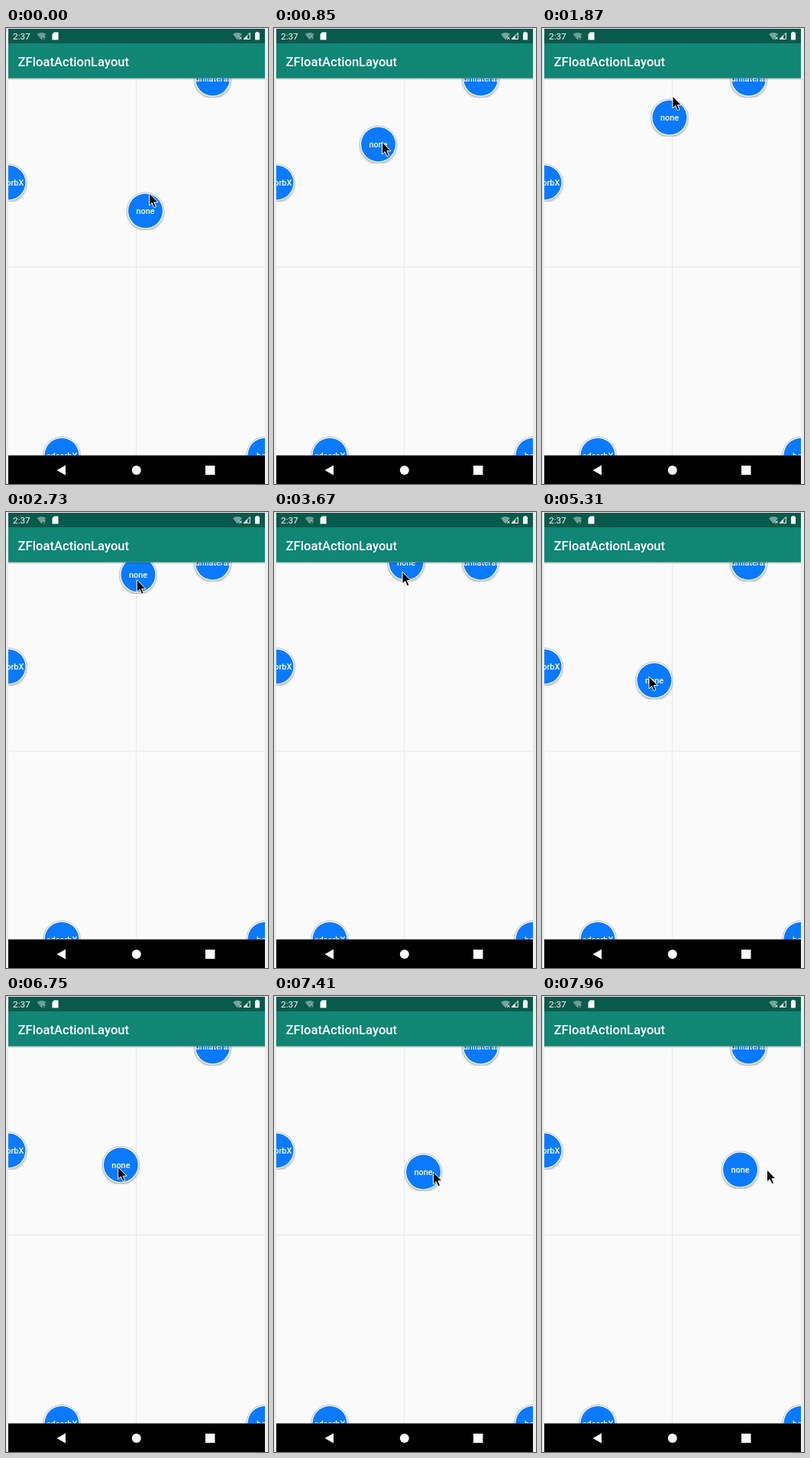
Write an HTML page that moves like this. It is 343x596 px and loops after 8000 ms.

```html
<!DOCTYPE html>
<html lang="en">
<head>
<meta charset="utf-8">
<title>Floating action layout</title>
<style>
  html, body { margin: 0; width: 100%; height: 100%; overflow: hidden; background: #ececec; }
  svg { display: block; width: 343px; height: 596px; }
  text { font-family: Roboto, Arial, sans-serif; fill: #fff; }
  .ball text { font-size: 10.9px; font-weight: 500; text-anchor: middle; }
  .title { font-size: 16.6px; font-weight: 500; }
  .clock { font-size: 11.8px; }
</style>
</head>
<body>
<svg viewBox="0 0 343 596" xmlns="http://www.w3.org/2000/svg">
  <defs>
    <clipPath id="content"><rect x="3" y="65.7" width="336" height="493"/></clipPath>
    <linearGradient id="barShadow" x1="0" y1="0" x2="0" y2="1">
      <stop offset="0" stop-color="#000" stop-opacity=".24"/>
      <stop offset="1" stop-color="#000" stop-opacity="0"/>
    </linearGradient>
    <filter id="soft" filterUnits="userSpaceOnUse" x="-25" y="-25" width="50" height="50">
      <feGaussianBlur stdDeviation="1.8"/>
    </filter>
  </defs>

  <rect width="343" height="596" fill="#ececec"/>
  <rect x="3" y="65" width="336" height="494" fill="#fafafa"/>
  <path d="M170.5 66V558M3 312.5H339" stroke="#e8e8e8" fill="none"/>
  <g id="balls" clip-path="url(#content)"></g>
  <rect x="3" y="65.7" width="336" height="2.6" fill="url(#barShadow)"/>

  <rect x="3" y="1" width="336" height="19.5" fill="#085a4c"/>
  <rect x="3" y="20" width="336" height="45.7" fill="#118675"/>
  <text class="clock" x="9" y="15">2:37</text>
  <text class="title" x="15.6" y="49.5">ZFloatActionLayout</text>

  <g fill="#fff">
    <path d="M40.5 8Q46.5 4 52.5 8L46.5 15.5Z" opacity=".4"/>
    <text x="48" y="15.5" font-size="8" opacity=".8">?</text>
    <path d="M63 5.5H68.5V15.5H60.5V8Z"/>
    <path d="M297 8Q303 4 309 8L303 15.5Z" opacity=".45"/>
    <path d="M305 11.5l3.5 3.5m0-3.5l-3.5 3.5" stroke="#fff"/>
    <path d="M311 14.5L319.3 6.500V14.5Z" fill="none" stroke="#fff"/>
    <path d="M316 9.8V14.5H311Z"/>
    <path d="M327.5 5h3v1.2h1.5v9.3h-6V6.2h1.5Z"/>
  </g>

  <rect x="3" y="558.6" width="336" height="37.4" fill="#000"/>
  <g fill="#fff">
    <path d="M66.5 578L78 571.5V584.5Z"/>
    <circle cx="170.8" cy="578" r="6"/>
    <rect x="261" y="572" width="12.5" height="12"/>
  </g>

  <path id="cursor" d="M0 0V16L3.700 12.600L6.300 18.700L9 17.600L6.400 11.700H11.500Z"
        fill="#000" stroke="#fff" stroke-linejoin="round"/>
</svg>
<script>
const LOOP = 8000;
const FRAME = 135;

// The screen refreshes about once per FRAME inside these spans and holds between them
const spans = [
  [120, 850], [980, 1120], [1240, 1870], [2030, 2180], [2580, 3550], [3670, 3670],
  [3950, 4880], [5030, 5310], [5580, 5730], [6190, 6320], [6750, 7410], [7540, 7960]
];

// Key poses of the drag: time, ball x and y, cursor offset from the ball
const poses = [
  [0, 182.5, 239, 5, -23],
  [266, 189, 208, 5, -18],
  [650, 130, 158, 0, -5],
  [850, 136.5, 152, 5, -3],
  [1120, 148, 147, 4, -8],
  [1870, 167, 117, 4, -28],
  [2180, 173, 66, 0, 5],
  [3130, 173, 94, -3, 8],
  [3550, 173, 66, -5, 12],
  [3950, 173, 66, -5, 12],
  [4880, 173, 105, -10, 58],
  [5310, 147, 220, -7, -5],
  [6700, 147, 220, -5, 3],
  [7410, 195.5, 230, 13, 0],
  [7960, 259.5, 227, 35, 0]
];

function heldTime(time) {
  const span = spans.filter(([first]) => first <= time).pop();
  if (!span) return 0;
  const [first, last] = span;
  if (time >= last) return last;
  const step = (last - first) / Math.round((last - first) / FRAME);
  return first + Math.floor((time - first) / step) * step;
}

function poseAt(time) {
  const next = poses.findIndex(([t]) => t > time);
  if (next < 0) return poses.at(-1);
  const from = poses[next - 1], to = poses[next];
  const k = (time - from[0]) / (to[0] - from[0]);
  return from.map((value, i) => value + (to[i] - value) * k);
}

function place(node, x, y) {
  node.setAttribute("transform", `translate(${x.toFixed(1)} ${y.toFixed(1)})`);
}

function addBall(label, x, y) {
  const ball = document.createElementNS("http://www.w3.org/2000/svg", "g");
  ball.setAttribute("class", "ball");
  ball.innerHTML = `
    <circle cy="2" r="24" fill="#000" opacity=".28" filter="url(#soft)"/>
    <circle r="24.2" fill="#fff" stroke="#b0b0b0" stroke-width=".8"/>
    <circle r="22.5" fill="#0b7aff"/>
    <text y="4">${label}</text>`;
  place(ball, x, y);
  document.getElementById("balls").append(ball);
  return ball;
}

addBall("unilateral", 270.5, 66);
addBall("adsorbX", 3, 202);
addBall("adsorbX", 73, 558.5);
addBall("both", 339, 558.5);
const draggedBall = addBall("none", 0, 0);
const cursor = document.getElementById("cursor");

function render(time) {
  const [, x, y, leadX, leadY] = poseAt(heldTime(time));
  place(draggedBall, x, y);
  place(cursor, x + leadX, y + leadY);
}

const start = performance.now();
function tick() {
  render((performance.now() - start) % LOOP);
  requestAnimationFrame(tick);
}
tick();
</script>
</body>
</html>
```
